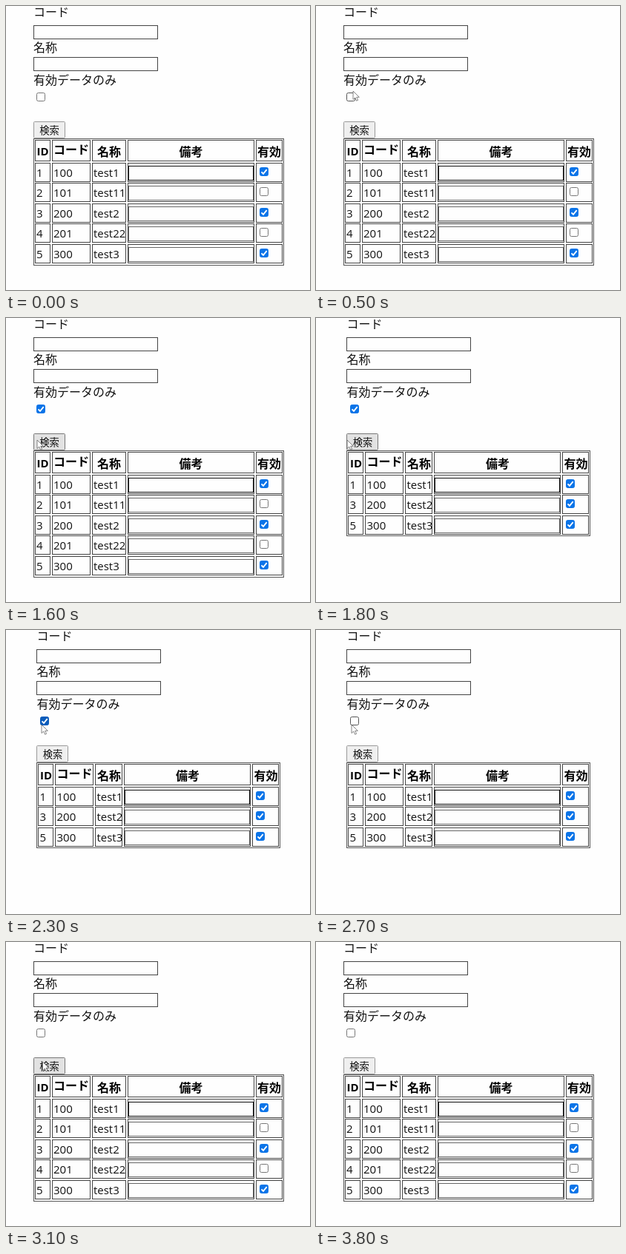
Animation of 410 by 384 pixels, one loop 4400 ms. Source, as an HTML page:

```html
<!DOCTYPE html>
<html lang="ja">
<head>
<meta charset="utf-8">
<style>
  html, body { margin: 0; width: 100%; height: 100%; overflow: hidden; background: #fefefe; }
  svg { display: block; width: 410px; height: 384px; }
  text { font: 15px "Open Sans", sans-serif; fill: #111; }
  .ja { font: 16px "Noto Sans CJK JP", "Noto Sans CJK", sans-serif; }
  .th { font-weight: 700; text-anchor: middle; fill: #000; }
  .btn { font-size: 13.33px; text-anchor: middle; }
</style>
</head>
<body>
<svg id="stage" viewBox="0 0 410 384"></svg>
<script>
const LOOP = 4400, TICK = 100, GAP = 2, ROW = 27.5;
const stage = document.getElementById('stage');
const HEADS = ['ID', 'コード', '名称', '備考', '有効'];

// Odd ids are active; even ids are the variant of the one before
const ROWS = [1, 2, 3, 4, 5].map(id => {
  const n = Math.ceil(id / 2), active = id % 2 === 1;
  return { id, code: n * 100 + !active, name: 'test' + (active ? n : `${n}${n}`), active };
});

// Places where the pointer rests
const STOPS = [
  { arrive: 100, leave: 100, x: 100, y: 365 },
  { arrive: 500, leave: 700, x: 50, y: 115 },
  { arrive: 900, leave: 1400, x: 46, y: 122 },
  { arrive: 1600, leave: 2000, x: 42, y: 165 },
  { arrive: 2300, leave: 2700, x: 48, y: 128 },
  { arrive: 3000, leave: 3400, x: 49.5, y: 162 },
  { arrive: 3700, leave: 3800, x: 100, y: 365 }
];

const during = (t, from, to) => t >= from && t < to;
const ease = p => p * p * (3 - 2 * p);

function pointerAt(t) {
  const i = STOPS.findLastIndex(s => s.arrive <= t);
  const a = STOPS[i], b = STOPS[i + 1];
  if (!a || (!b && t >= a.leave)) return null;
  if (t <= a.leave) return a;
  const p = ease((t - a.leave) / (b.arrive - a.leave));
  return { x: a.x + (b.x - a.x) * p, y: a.y + (b.y - a.y) * p };
}

const box = (x, y, w, h, stroke = '#444', fill = 'none', r = 0) =>
  `<rect x="${Math.floor(x) + .5}" y="${Math.floor(y) + .5}" width="${w - 1}" height="${h - 1}" rx="${r}" fill="${fill}" stroke="${stroke}"/>`;

const text = (x, y, str, cls = '') => `<text x="${x}" y="${y}" class="${cls}">${str}</text>`;

function check(x, y, on, hover) {
  const blue = hover ? '#0b5cbb' : '#0b74e8';
  if (!on) return box(x, y, 12, 12, hover ? '#555' : '#777', '#fff', 2);
  return box(x, y, 12, 12, blue, blue, 2) +
    `<path d="M${Math.floor(x) + 2.5} ${Math.floor(y) + 6.3}l2.5 2.6 4.7-5.8" fill="none" stroke="#fff" stroke-width="1.8"/>`;
}

const arrow = ({ x, y }) =>
  `<path d="M${x} ${y}v11.5l2.7-2.5 1.9 4.2 2-.9-1.9-4h3.6z" fill="#fff" stroke="#666" stroke-width=".8"/>`;

function form(x, ticked, overCheck, overButton, pressed) {
  const face = pressed ? '#f5f5f5' : overButton ? '#e2e2e2' : '#efefef';
  const edge = pressed ? '#bbb' : overButton ? '#777' : '#999';
  return text(x, 14, 'コード', 'ja') + box(x, 26, 168, 19) +
    text(x, 62, '名称', 'ja') + box(x, 69, 168, 19) +
    text(x, 105.5, '有効データのみ', 'ja') +
    check(x + 4.5, 117, ticked, overCheck) +
    box(x, 156, 43, 23, edge, face, 1) +
    text(x + 21.5, 173, '検索', 'ja btn');
}

function table(x, width, widths, rows) {
  const bottom = Math.floor(213 + rows.length * 27.6);
  let out = box(x, 179, width, bottom - 179, '#555');
  let left = x + GAP;
  widths.forEach((w, i) => {
    const baseline = [202, 200, 203, 203, 203][i];
    out += box(left, 181, w, 29) + text(left + w / 2, baseline, HEADS[i], i ? 'ja th' : 'th');
    rows.forEach((row, k) => {
      const y = Math.floor(212 + k * ROW);
      out += box(left, y, w, 26);
      if (i < 3) out += text(left + 2, y + 19, [row.id, row.code, row.name][i]);
      else if (i === 3) out += box(left + 1, y + 4, 169, 20, k ? '#666' : '#111');
      else out += check(left + 5, y + 6, row.active);
    });
    left += w + GAP;
  });
  return out;
}

function draw(t) {
  const ticked = during(t, 900, 2500);
  const filtered = during(t, 1800, 3100);
  const pressed = during(t, 3000, 3100);
  const at = pointerAt(t);
  const overCheck = at && at.x < 56 && during(at.y, 115, 130);
  const overButton = at && at.x < 84 && during(at.y, 156, 179);

  // The name column fits its longest entry; the page stays centred
  const widths = [21, 52, filtered ? 37 : 46, 171, 36];
  const width = widths.reduce((sum, w) => sum + w + GAP, GAP);
  const x = (412 - width) / 2;
  const rows = ROWS.filter(r => r.active || !filtered);
  stage.innerHTML = form(x, ticked, overCheck, overButton, pressed) +
    table(x, width, widths, rows) + (at ? arrow(at) : '');
}

let shown;
function frame() {
  const t = Math.floor(performance.now() % LOOP / TICK) * TICK;
  if (t !== shown) draw(shown = t);
  requestAnimationFrame(frame);
}
frame();
</script>
</body>
</html>
```
